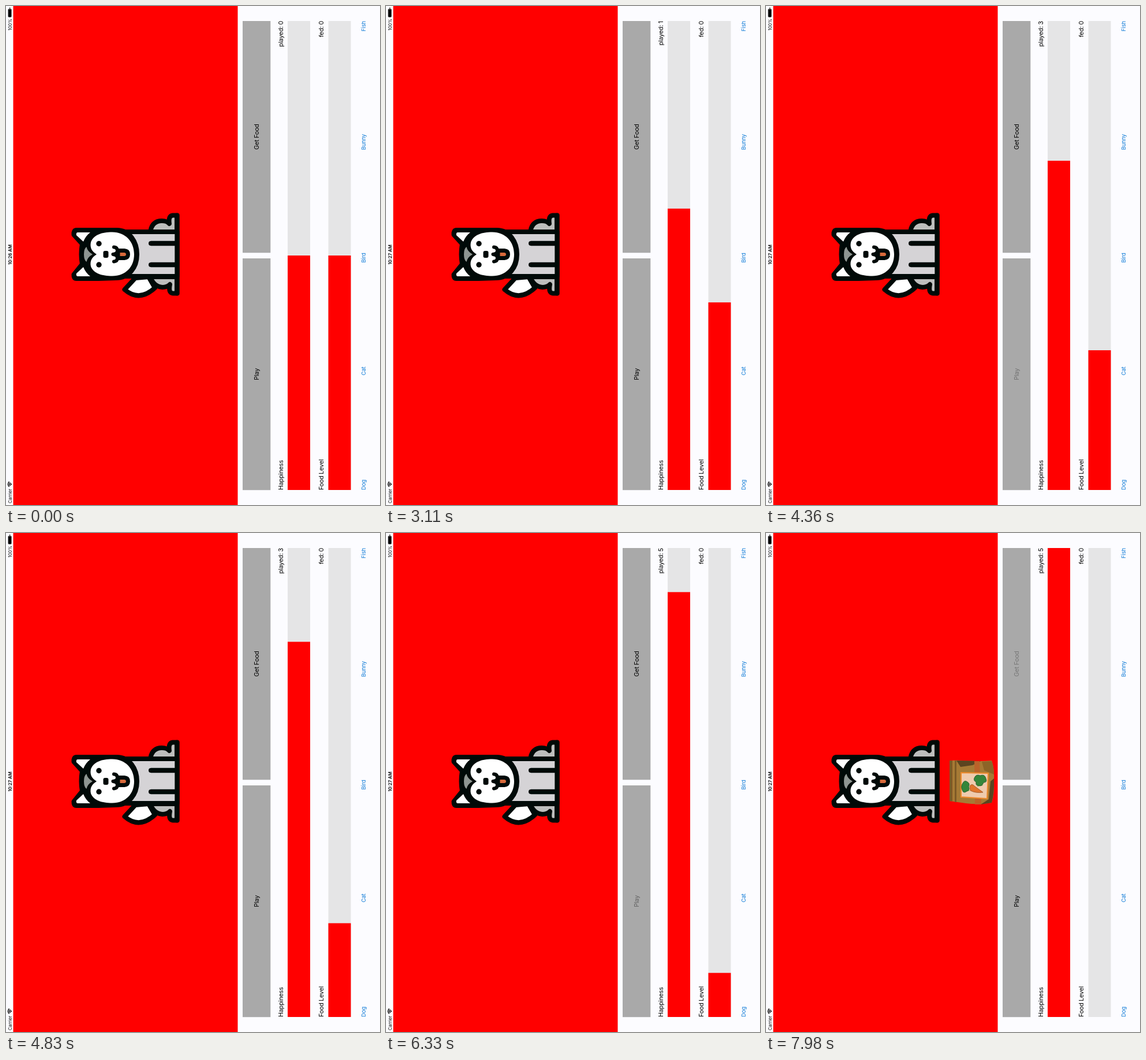
Recreate the animation shown at these times as an HTML page. Size 648x864 px, loop 8000 ms.

```html
<!DOCTYPE html>
<html lang="en">
<head>
<meta charset="utf-8">
<title>Pet panel</title>
<style>
  html, body { margin: 0; width: 100%; height: 100%; overflow: hidden; background: #fcfcff; }
  svg { display: block; width: 100%; height: 100%; }
  text { font: 10.75px Inter, "Liberation Sans", sans-serif; letter-spacing: -.22px; }
  .status text { font-size: 7.7px; letter-spacing: 0; }
  .links text { font-size: 9.5px; letter-spacing: -.15px; fill: #0a78d6; }
  .mid { text-anchor: middle; }
  .end { text-anchor: end; }
  .ink { fill: none; stroke: #000a08; stroke-width: 8; stroke-linecap: round; stroke-linejoin: round; }
</style>
</head>
<body>
<svg viewBox="0 0 648 864">
  <rect width="648" height="864" fill="#fcfcff"/>
  <rect x="12.5" width="389" height="864" fill="#f00"/>

  <g fill="#a9a9a9">
    <rect x="410" y="26" width="48.3" height="401.3"/>
    <rect x="410" y="437" width="48.3" height="401.2"/>
  </g>
  <g fill="#e5e5e6">
    <rect x="488" y="26" width="39" height="812"/>
    <rect x="558.5" y="26" width="39" height="812"/>
  </g>
  <g fill="#f00">
    <rect id="joyBar" x="488" width="39"/>
    <rect id="foodBar" x="558.5" width="39"/>
  </g>

  <!-- dog, lying sideways like the rest of the screen -->
  <g class="ink">
    <path fill="#fff" d="M224 471 L205.5 491 Q231 513 258 488 L247 469 Z"/>
    <path fill="#bdbebd" d="M250 391 Q253 372 270 372 Q279 372 283 377 Q281 363 289 362.5 H296 V391 Z"/>
    <path fill="#bdbebd" d="M250 469 Q256 486 271 487 Q279 487 284 482 Q281 497 289 497.5 H296 V469 Z"/>
    <path fill="#d5d3d6" d="M204 391 H296.5 V468 H204 Z"/>
    <path d="M251 411 H296 M251 448 H296" stroke-linecap="butt" stroke-width="8.5"/>
    <path d="M251 411 H290 M251 448 H290"/>
    <path d="M296.7 362.5 V497.5"/>
    <path fill="#000a08" d="M122 388 H192 C214 388 227 408 227 430 C227 453 213 471 190 471 L160 472 H122 Q117 472 117.5 465 L132 447 Q129 430 132 412 L117.5 396 Q117 388 122 388 Z"/>
  </g>
  <path fill="#8f9692" d="M135 430 Q135 420 139.500 417 Q141 425 150 430 Q141 435 139.500 443 Q135 440 135 430 Z"/>
  <g fill="#fff">
    <path d="M157 430 C149 425 145 419 147 409 C152 396 166 391.500 184 391.500 C207 391.500 222 408 222 430 C222 452 207 467.500 184 467.500 C166 467.500 152 463 147 451 C145 441 149 435 157 430 Z"/>
    <path id="ear" d="M124 392 H146 Q138 398 134 408 L122 397 Q121 392.500 124 392 Z"/>
    <use href="#ear" transform="matrix(1 0 0 -1 0 860)"/>
  </g>
  <g fill="#000a08">
    <circle cx="161" cy="411.500" r="4.700"/>
    <circle cx="161" cy="448" r="4.700"/>
    <rect x="168.500" y="424" width="9" height="12" rx="3"/>
  </g>
  <g class="ink" stroke-width="7" style="stroke-width:7">
    <path fill="#d8693a" d="M194 423.500 H205 Q211.500 424 211.500 430 Q211.500 436 205 436.500 H194 Z"/>
    <path style="stroke-width:6" d="M187 417.500 Q193 418 193 424 Q193 429 185.500 430 Q193 431 193 436 Q193 442 187 442.500"/>
  </g>

  <g id="bag">
    <path fill="#a67a35" d="M318 394 L331 393.500 Q365 396 391 394 Q396 408 395 430 Q396 452 391 467 Q370 471 346 468 L318 464 Z"/>
    <path fill="#7d5a26" d="M318 394 L323 394 V464.500 L318 464 Z M327 394 H330 V466 H327 Z"/>
    <path fill="#5b4420" d="M330 394 Q350 394 372 395 L358 402 L337 405 Z M372 470 L391 467 Q396 450 395 425 L389 430 L386 461 Z"/>
    <path fill="#b9622a" d="M361 395 L370 395 L373 470 L362 470 Z"/>
    <path fill="#8c6427" d="M374 396 L391 395 Q395 405 395 418 L378 411 Z"/>
    <path fill="#efcbae" stroke="#ee8a2c" stroke-width="2" d="M338 415 L385 416 L383 460 L338 457 Z"/>
    <path fill="#e0752c" stroke="#8d4a1c" stroke-width=".7" d="M353 438 Q357 433 361 438 L376 449 Q364 451 354 446 Z"/>
    <g fill="#6aa843">
      <path d="M344 440 L353 446 L344 449 Z M369 431 L376 437 L366 439 Z"/>
    </g>
    <g fill="#35863a" stroke="#1c5526" stroke-width=".8">
      <path d="M341 433 Q344 427 349 431 Q354 434 351 439 Q354 445 348 447 Q342 452 340 445 Q337 439 341 433 Z"/>
      <path d="M361 424 Q364 417 371 420 Q379 417 381 425 Q384 432 377 432 Q374 440 368 437 Q363 438 364 431 Q359 429 361 424 Z"/>
    </g>
  </g>

  <!-- landscape coordinates: x runs up the stage, y to the right -->
  <g transform="translate(0 864) rotate(-90)">
    <g class="status">
      <text x="3" y="9.500">Carrier</text>
      <g fill="none" stroke="#000" stroke-width="1.500">
        <path d="M31.500 5.500 Q36 1.500 40.500 5.500 M33.200 7.400 Q36 5 38.800 7.400"/>
      </g>
      <path d="M34.300 8.500 Q36 7 37.700 8.500 L36 10.300 Z"/>
      <text id="clock" class="mid" x="433.500" y="9.500" font-weight="600" style="font-weight:600"></text>
      <text class="end" x="842" y="9.500">100%</text>
      <rect x="844.800" y="3.800" width="14" height="5.600" rx="1.300" stroke="#555" stroke-width=".5"/>
      <rect x="859.700" y="5.400" width="1.200" height="2.400" rx=".6"/>
    </g>
    <text id="play" class="mid" x="226.500" y="437.800">Play</text>
    <text id="getFood" class="mid" x="637.500" y="437.800">Get Food</text>
    <text x="26" y="480">Happiness</text>
    <text id="played" class="end" x="838" y="480"></text>
    <text x="26" y="550">Food Level</text>
    <text class="end" x="838" y="550">fed: 0</text>
    <g class="links">
      <text x="26" y="623">Dog</text>
      <text class="mid" x="232" y="623">Cat</text>
      <text class="mid" x="428" y="623">Bird</text>
      <text class="mid" x="628.500" y="623">Bunny</text>
      <text class="end" x="838" y="623">Fish</text>
    </g>
  </g>
</svg>
<script>
const LOOP = 8000, SLIDE = 500, FADE = 320;
const CLOCK_TICK = 480;
// [finger down, finger up] in ms
const playTaps = [[2450, 2580], [3330, 3500], [4270, 4310], [5160, 5232], [6080, 6245]];
const foodTaps = [[7720, 7945]];

const el = id => document.getElementById(id);
const clamp = v => Math.min(1, Math.max(0, v));

// cubic-bezier(.42, 0, .58, 1), solved by bisection
function easeInOut(x) {
  let lo = 0, hi = 1;
  for (let i = 0; i < 20; i++) {
    const s = (lo + hi) / 2, r = 1 - s;
    if (1.26 * s * r * r + 1.74 * s * s * r + s * s * s < x) lo = s; else hi = s;
  }
  return x <= 0 ? 0 : x >= 1 ? 1 : lo * lo * (3 - 2 * lo);
}

function labelAlpha(taps, t) {
  const tap = taps.filter(([down]) => t >= down).pop();
  return tap ? 0.2 + 0.8 * clamp((t - tap[1]) / FADE) : 1;
}

function setBar(id, level) {
  const height = 812 * level;
  el(id).setAttribute('y', 838 - height);
  el(id).setAttribute('height', height);
}

function draw(t) {
  const gain = playTaps.reduce((sum, [, up]) => sum + easeInOut((t - up) / SLIDE), 0) / 10;
  setBar('joyBar', 0.5 + gain);
  setBar('foodBar', Math.max(0, 0.5 - gain));
  el('played').textContent = 'played: ' + playTaps.filter(([, up]) => t >= up).length;
  el('clock').textContent = t < CLOCK_TICK ? '10:26 AM' : '10:27 AM';
  el('play').style.opacity = labelAlpha(playTaps, t);
  el('getFood').style.opacity = labelAlpha(foodTaps, t);
  el('bag').style.display = t >= foodTaps[0][1] ? '' : 'none';
}

const start = performance.now();
function tick() {
  draw((performance.now() - start) % LOOP);
  requestAnimationFrame(tick);
}
tick();
</script>
</body>
</html>
```
